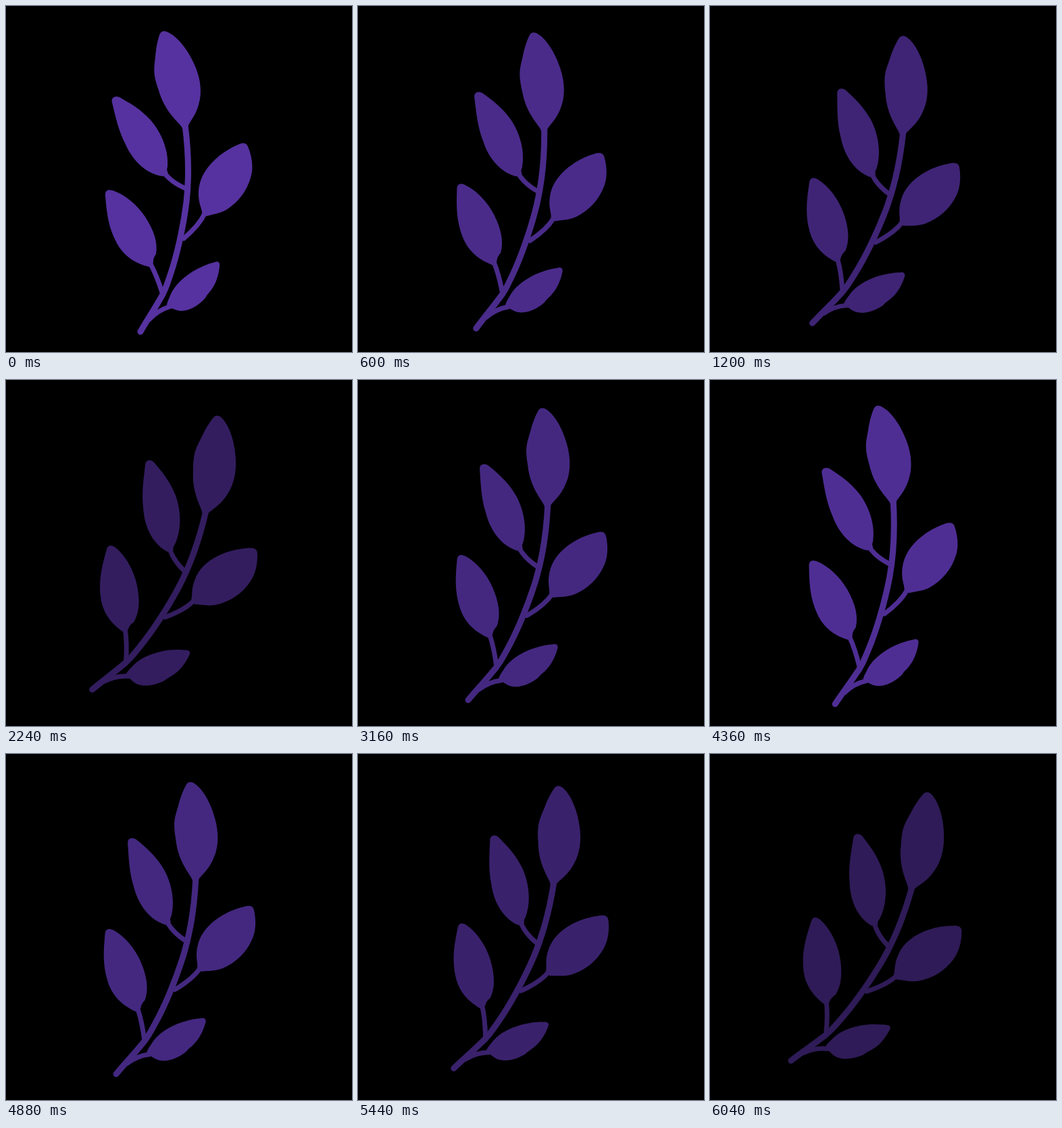
Animation of 512x512 px, one loop 6.88 s. Source, as an HTML page:

```html
<!DOCTYPE html>
<html lang="en">
<head>
<meta charset="utf-8">
<title>Swaying sprig</title>
<style>
  html, body { margin: 0; height: 100%; background: #000; overflow: hidden; }
  svg { display: block; width: 100vw; height: 100vh; }
  .stems { fill: none; stroke: #5632a0; stroke-width: 7; stroke-linecap: round; }
  .leaves { fill: #5632a0; }
</style>
</head>
<body>
<svg viewBox="0 0 512 512">
  <g id="sprig">
    <g class="stems">
      <path stroke-width="9" style="stroke-width:9" d="M265 176C270 215 271 255 267 290C262 330 252 372 243 398C238 413 234 425 226 437C220 448 208 466 199 482"/>
      <path d="M235 248C243 258 254 265 266 270"/>
      <path d="M294 307C288 320 276 333 263 344"/>
      <path d="M214 382C220 393 226 408 231 424"/>
      <path d="M242 445C232 448 222 453 212 464"/>
    </g>
    <g class="leaves">
      <path d="M261 181C259 174 236 160 226 125C217 100 219 93 221 75C222 62 224 52 227 43C229 37 234 36 240 39C255 46 270 67 278 85C288 106 290 126 286 142C283 157 276 166 270 176L268 182Z"/>
      <path d="M232 252C210 249 189 232 177 205C166 184 162 163 157 143C155 136 161 132 168 135C184 144 200 153 215 170C231 189 241 215 239 238Q237 243 240 247Z"/>
      <path d="M290 306C290 299 284 292 285 274C286 253 299 236 313 224C322 216 334 209 346 204C352 202 356 203 358 208C364 222 366 238 363 250C358 272 345 289 327 301C317 307 306 308 297 311Z"/>
      <path d="M212 386C192 381 175 371 164 351C151 327 149 305 147 281C146 273 151 271 158 273C176 279 194 294 206 312C219 332 225 350 222 367Q217 374 218 380Z"/>
      <path d="M238 447C237 440 241 434 244 426C250 413 262 402 276 393C286 387 297 382 309 379C314 377 317 380 316 385C315 397 311 410 305 418C303 422 298 426 295 432C288 440 275 450 262 451C254 452 248 448 244 447Z"/>
    </g>
  </g>
</svg>
<script>
  const LOOP = 6880, TICK = 40;
  const FPS = 24000 / 1001;   // pose rate, shown on 40 ms ticks
  const SWING = 48;           // poses per one-way swing
  const LAST = 3 * SWING;     // three swings, then hold
  const ANGLE = 22.7, DIM = 0.456;
  const sprig = document.getElementById('sprig');
  const start = performance.now();

  function draw() {
    const time = (performance.now() - start) % LOOP;
    const seconds = Math.floor(time / TICK) * TICK / 1000;
    const pose = Math.min(LAST, Math.floor(seconds * FPS));
    const phase = pose % (2 * SWING);
    const sway = 1 - Math.abs(phase - SWING) / SWING;
    sprig.setAttribute('transform', `rotate(${ANGLE * sway} 230 271)`);
    sprig.setAttribute('opacity', 1 - DIM * sway);
    requestAnimationFrame(draw);
  }
  draw();
</script>
</body>
</html>
```
